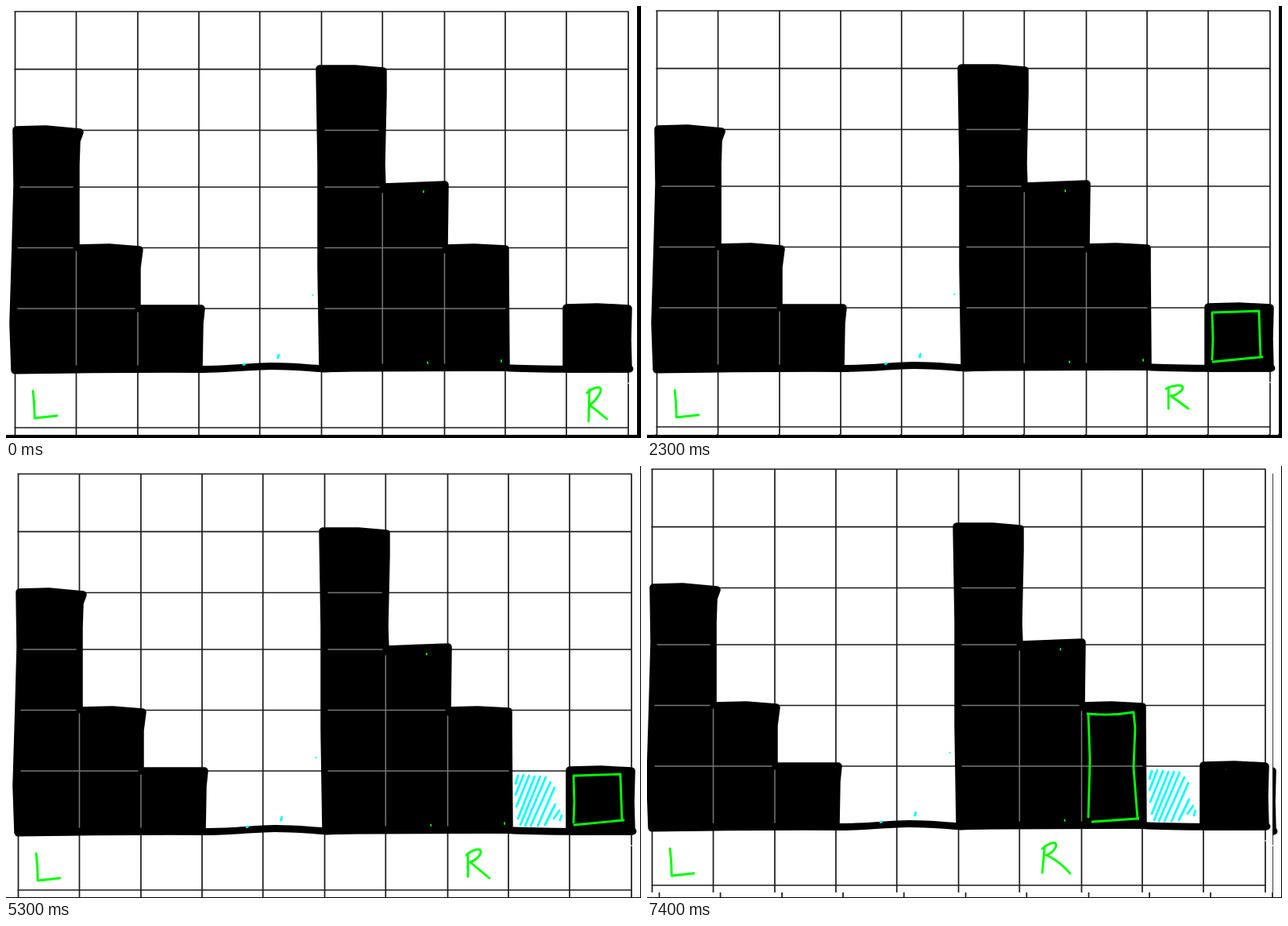
An HTML page that plays this animation: 800 by 544 pixels, repeating every 8000 ms.

```html
<!DOCTYPE html>
<html lang="en">
<head>
<meta charset="utf-8">
<title>Trapping rain water</title>
<style>
  html, body { margin: 0; width: 100%; height: 100%; overflow: hidden; background: #000; }
  svg { display: block; width: 800px; height: 544px; }
  path { fill: none; stroke-linecap: round; stroke-linejoin: round; }
  .grid { stroke: #1c1c1c; stroke-width: 1.7; }
  .wall { fill: #000; stroke: #000; stroke-width: 9.5; }
  .floor { stroke: #000; stroke-width: 8.8; }
  .seam { stroke: #777; stroke-width: 1.5; }
  .pen { stroke: #0f0; stroke-width: 2.9; }
  .water { stroke: #0ff; stroke-width: 2.8; }
  .speck { stroke-width: 3; }
  .step { visibility: hidden; animation: 8s step-end infinite; }
  .one { animation-name: one; }
  .two { animation-name: two; }
  .three { animation-name: three; }
  @keyframes one { 0% { visibility: hidden; } 6.25%, 100% { visibility: visible; } }
  @keyframes two { 0% { visibility: hidden; } 43.75%, 100% { visibility: visible; } }
  @keyframes three { 0% { visibility: hidden; } 81.25%, 100% { visibility: visible; } }
</style>
</head>
<body>
<svg viewBox="0 0 800 544">
  <defs>
    <clipPath id="page"><rect width="788" height="537"/></clipPath>

    <g id="board">
      <rect x="-10" y="-10" width="805" height="550" fill="#fff"/>
      <path class="grid" stroke-linecap="butt" d="M11.5 7V540M88.5 7V540M166 7V540M243 7V540M319.700 7V540M397.500 7V540M474.300 7V540M552.500 7V540M629 7V540M706 7V540M784 7V540
        M11 7H784M11 79.700H784M11 156.500H784M11 228H784M11 304.500H784M11 381H784M11 457H784M11 531H784"/>
      <path class="wall" d="M13 156 50 155 93 159 89 170 88 200V305L130 304 168 307 165 330V381L246 381 244 400 243 456 11 458 9 400 12 300 14 225Z"/>
      <path class="wall" d="M395 79 440 79 475 82 475 110 473 200 474 228 553 225 552 305 590 304 629 306 629 330 630 455 399 456 397 330 397 200Z"/>
      <path class="wall" d="M706 380 745 379 784 381 783 420 784 457 706 457Z"/>
      <path class="floor" d="M11 459Q130 457 250 457.500C290 457 310 453.500 335 453.500S370 455 400 457Q480 453 630 455.500Q660 458 786 457"/>
      <path class="seam" d="M18 228H84M15 304.500H84M15 381H162M88.500 309V452M166 386V452
        M402 156.500H469M402 228H470M402 304.500H549M402 381H629M474.300 236V450M552.500 312V450"/>
      <path class="water speck" d="M299.500 451.500 300.500 451M342.500 443 343.500 439.500"/>
      <path class="water" style="stroke-width:1.5" d="M386 363.500 387 364.500"/>
      <path class="pen" style="stroke-width:1.8" d="M526 233V234.500M531 448.500 531.500 450M624 446V448"/>
      <path stroke="#fff" stroke-width="1.500" d="M784 475H784.500"/>
      <path class="pen" d="M34 485Q36 502 36 519L64 516"/>
    </g>

    <path id="box" class="pen" d="M711 387 770 385 771 415 772 443M774 443 712 449M711 387 712 420 711 446"/>

    <path id="pool" class="water" d="M641 387 638 397M648 386 638 411M655 387 639 426M662 388 641 441M669 388 644 449M676 389 650 450M682 395 657 450M687 402 666 450M688 423 675 449M693 431 686 441M696 437 694 443"/>
  </defs>

  <g>
    <use href="#board"/>
    <path class="pen" d="M735 483 734 523M732 487C737 482 747 478 749 482S742 499 735 502L757 520"/>
  </g>

  <g class="step one">
    <g transform="translate(1 -1)">
      <use href="#board"/>
      <use href="#box"/>
    </g>
    <path class="pen" d="M657 480V507M654 482C661 478 674 476 675 480S666 491 660 491L682 507"/>
  </g>

  <g class="step two">
    <g transform="translate(4 3)">
      <use href="#board"/>
      <use href="#box"/>
      <use href="#pool"/>
    </g>
    <path class="pen" d="M582 488V517M580 490C586 484 597 480 598 485S591 497 585 499L609 519"/>
  </g>

  <g class="step three" clip-path="url(#page)">
    <g transform="translate(-5 -3)">
      <use href="#board"/>
      <use href="#pool"/>
    </g>
    <path class="pen" d="M555 312Q585 315 613 310L615 330 613 380 618 444M618 444 561 448M556 313 558 370 556 442"/>
    <path class="pen" d="M501 479 498 512M498 482C503 477 513 472 515 476S509 489 503 490Q518 496 533 513"/>
    <path stroke="#333" stroke-width="1.500" d="M729 382H729.500"/>
  </g>
</svg>
</body>
</html>
```
